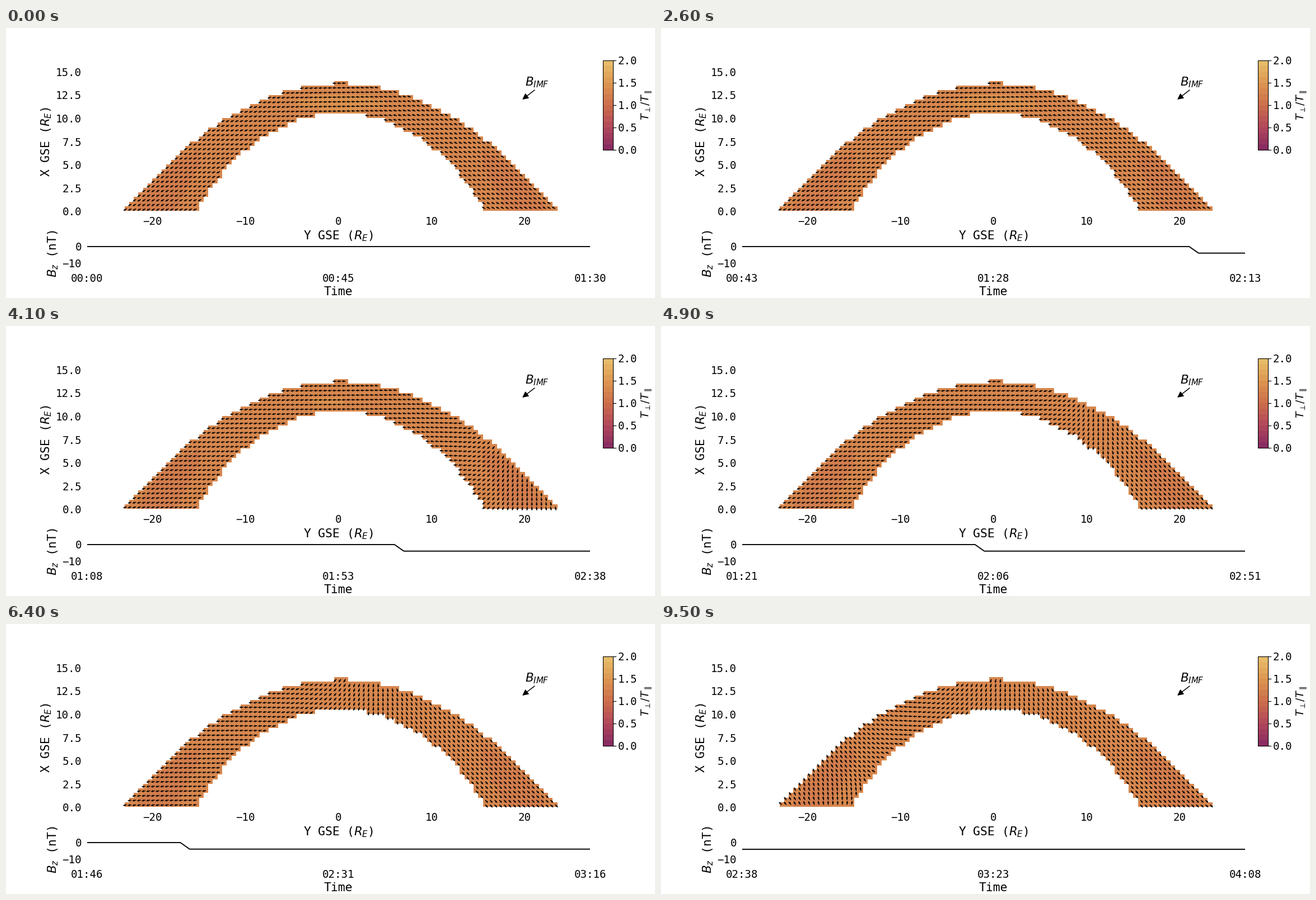
A matplotlib script that plays this animation: 1159x483 px, repeating every 9600 ms.

```python
import matplotlib
import matplotlib.pyplot as plt
import numpy as np
from matplotlib.animation import FuncAnimation
from matplotlib.collections import PolyCollection
from matplotlib.colors import BoundaryNorm, LinearSegmentedColormap
from matplotlib.patches import FancyArrowPatch, Rectangle

W, H, DPI = 1159, 483, 64
FRAMES, STEP = 96, 100          # each frame advances the clock by 100 s
SCALE, X0, Y0 = 16.63, 594.0, 327.4
LEFT, RIGHT = 145, 1043
TICK, LABEL = 19.1, 21.4        # font sizes in pixels

matplotlib.rcParams["mathtext.fontset"] = "dejavusans"


def pt(px):
    return px * 72 / DPI


def px_x(u):
    return X0 + SCALE * np.asarray(u)


def px_y(v):
    return Y0 - SCALE * np.asarray(v)


fig = plt.figure(figsize=(W / DPI, H / DPI), dpi=DPI, facecolor="white")
ax = fig.add_axes([0, 0, 1, 1])
ax.axis("off")


def label(x, y, s, size=TICK, ha="center", rot=0):
    return ax.text(x, y, s, fontsize=pt(size), ha=ha, va="baseline",
                   family="DejaVu Sans Mono", color="black",
                   rotation=rot, rotation_mode="anchor")


# Sheath region between two nearly parabolic boundaries
xs = np.arange(-23, 23.1, 0.5)
vs = np.arange(0, 14, 0.5)
gx, gv = np.meshgrid(xs, vs)
outer = np.sqrt(39.4 * (13.507 - gv))
gap = np.clip(10.3 - gv, 0, None)
inner = np.sqrt(28.05 * gap - 0.51 * gap ** 2)
inside = (abs(gx) <= outer) & (abs(gx) >= inner)
cx, cv = gx[inside], gv[inside]
depth = ((abs(gx) - inner) / (outer - inner))[inside]

# Field direction before and after the turning, and its timing
ang_before = 180 - 33 * np.tanh(cx / 12)
ang_after = 205 + 112 * np.tanh((cx + 6.2) / 11)
ang_after -= np.where(cx < -10, 11 * (cx + 20) * np.clip(1 - cv / 3.5, 0, 1), 0)
turn_at = 53.5 - 18 * np.tanh((cx - 5.5) / 13)
turn_len = 2.2 + 3.3 * np.exp(-(cx / 8) ** 2)
flank = np.clip(-cx / 12, 0, 1)


def progress(t):
    return 1 / (1 + np.exp(-(t - turn_at) / turn_len))


def direction(t):
    dt = t - 20
    drift = 8 * (1 - np.exp(-dt / 5)) + 0.15 * dt
    start = ang_before - drift * flank
    return np.radians(start + (ang_after - start) * progress(t))


def ratio(t):
    nose = np.exp(-(cx / 6) ** 2 - ((cv - 11.3) / 1.2) ** 2)
    belly = np.sin(np.pi * depth ** 1.5)
    side = np.exp(-((abs(cx) - 19) / 4) ** 2)
    return 1.3 + 0.14 * nose * (1 - progress(t + 18)) - 0.12 * belly * side


cmap = LinearSegmentedColormap.from_list(
    "warm", ["#8a2c61", "#b4495b", "#cc6e4b", "#dc944f", "#e7bc68"])
norm = BoundaryNorm(np.linspace(0, 2, 17), 256)
grid = np.ma.masked_all(gx.shape)
grid[inside] = ratio(20)
mesh = ax.pcolormesh(px_x(np.append(xs, 23.5)), px_y(np.append(vs, 14)), grid,
                     cmap=cmap, norm=norm, linewidth=0, antialiased=False)

# Arrows start in the middle of their cells
shape = np.array([(0, -0.8), (3.4, -0.8), (2.6, -2.1), (7.3, 0),
                  (2.6, 2.1), (3.4, 0.8), (0, 0.8)])
tail = np.stack([px_x(cx + 0.25), px_y(cv + 0.25)], axis=1)
arrows = ax.add_collection(PolyCollection([], facecolor="black",
                                          edgecolor="none", zorder=3))


def arrow_verts(ang):
    c, s = np.cos(ang)[:, None], np.sin(ang)[:, None]
    a, b = shape[:, 0], shape[:, 1]
    return tail[:, None, :] + np.stack([a * c - b * s, -a * s - b * c], axis=2)


# Axis labels
for v in np.arange(0, 15.1, 2.5):
    label(135, px_y(v) + 7.9, f"{v:.1f}", ha="right")
for u in range(-20, 21, 10):
    label(px_x(u) - 0.4, 352, str(u).replace("-", "\u2212"))
label(593.6, 378, "Y GSE ($R_E$)", LABEL)
label(78.5, 203.3, "X GSE ($R_E$)", LABEL, rot=90)
label(90, 403.5, "$B_z$ (nT)", LABEL, rot=90)
label(135, 398, "0", ha="right")
label(135, 428.5, "\u221210", ha="right")
label(593.6, 478, "Time", LABEL)

# Upstream field marker
label(927, 103, "$B_{IMF}$", LABEL, ha="left")
ax.add_patch(FancyArrowPatch((944, 111), (922, 128), arrowstyle="-|>",
                             mutation_scale=pt(22), color="black",
                             linewidth=pt(1.5), shrinkA=0, shrinkB=0))

# Colour bar
bar_x, bar_top, bar_bottom = (1066, 1084), 58, 217.5
levels = np.linspace(bar_bottom, bar_top, 17)
ax.pcolormesh(bar_x, levels, (np.arange(16)[:, None] + 0.5) / 8,
              cmap=cmap, norm=norm, linewidth=0, antialiased=False)
ax.add_patch(Rectangle((bar_x[0], bar_top), bar_x[1] - bar_x[0],
                       bar_bottom - bar_top, fill=False, edgecolor="black",
                       linewidth=pt(1.1), zorder=4))
for val in np.arange(0, 2.1, 0.5):
    y = bar_bottom + (bar_top - bar_bottom) * val / 2
    ax.plot([bar_x[1], 1088.5], [y, y], color="black", linewidth=pt(1.2))
    label(1092.5, y + 7.2, f"{val:.1f}", ha="left")
label(1149, 138, r"$T_\perp/T_\parallel$", TICK, rot=90)

# Scrolling field record: a single drop between two samples
WINDOW, DROP = 54, 74
bz_line, = ax.plot([], [], color="black", linewidth=pt(1.9),
                   solid_capstyle="butt")
clocks = [label(x, 454.3, "") for x in (LEFT - 0.5, X0 - 0.5, RIGHT)]

ax.set_xlim(0, W)
ax.set_ylim(H, 0)


def update(i):
    samples = np.arange(i, i + WINDOW + 1)
    bz_line.set_data(np.linspace(LEFT, RIGHT, WINDOW + 1),
                     np.where(samples <= DROP, 391, 402.7))
    for k, text in enumerate(clocks):
        minutes = i * STEP // 60 + 45 * k
        text.set_text(f"{minutes // 60:02d}:{minutes % 60:02d}")
    t = min(max(i, 20), 80)     # the field only evolves in this span
    grid[inside] = ratio(t)
    mesh.set_array(grid.copy())
    arrows.set_verts(arrow_verts(direction(t)))
    return [bz_line, mesh, arrows, *clocks]


anim = FuncAnimation(fig, update, frames=FRAMES, interval=100,
                     init_func=lambda: update(0), repeat=True, repeat_delay=0)
plt.show()
```
